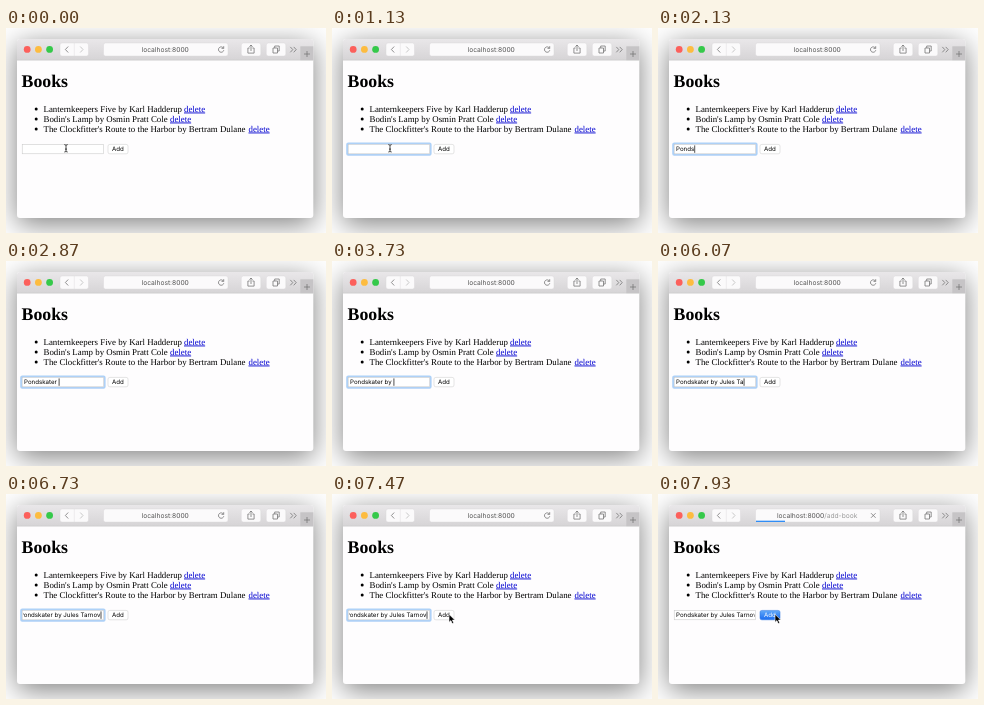
Animation, 320 px wide and 205 px high, one loop 8000 ms. Source, as an HTML page:

```html
<!DOCTYPE html>
<html lang="en">
<head>
<meta charset="utf-8">
<title>Books</title>
<style>
  html, body { margin: 0; width: 100%; height: 100%; overflow: hidden; background: #fff; }
  svg { display: block; width: 100%; height: 100%; }
  text { text-rendering: geometricPrecision; white-space: pre; }
  .ui { font-family: Inter, Roboto, sans-serif; font-size: 6.15px; }
  .page { font-family: "Liberation Serif", "Times New Roman", serif; font-size: 8.86px; }
  .link { fill: #0000d0; text-decoration: underline; }
  .icon { fill: none; stroke: #777; stroke-width: .8; }
  .control { fill: #fbfafb; stroke: #d6d4d6; stroke-width: .4; }
  #win { filter: drop-shadow(0 6px 14px rgba(0, 0, 0, .5)); }
</style>
</head>
<body>
<svg viewBox="0 0 320 205">
  <defs>
    <linearGradient id="bar" x2="0" y2="1">
      <stop stop-color="#e9e7e9"/><stop offset="1" stop-color="#d6d4d6"/>
    </linearGradient>
    <linearGradient id="blue" x2="0" y2="1">
      <stop stop-color="#62a9f8"/><stop offset="1" stop-color="#1a6cf0"/>
    </linearGradient>
    <clipPath id="inner"><path d="M17.3 116h79.4v10h-79.4z"/></clipPath>
  </defs>

  <rect id="win" x="11" y="11" width="296.3" height="179" rx="3" fill="#fefdfe"/>
  <path d="M11 32.2V14a3 3 0 0 1 3-3h290.3a3 3 0 0 1 3 3v18.2z" fill="url(#bar)"/>
  <path d="M294.3 18.3h13v13.9h-13z" fill="#c6c4c6"/>
  <path d="M11 32.1h296.3" stroke="#c2c0c2" stroke-width=".5"/>
  <circle cx="21.2" cy="21.4" r="3.4" fill="#fc605c"/>
  <circle cx="32.4" cy="21.4" r="3.4" fill="#fdbc40"/>
  <circle cx="43.6" cy="21.4" r="3.4" fill="#35c94a"/>

  <g class="control">
    <rect x="54" y="15" width="28.5" height="13" rx="2"/>
    <rect x="97.5" y="15" width="124.5" height="13" rx="2"/>
    <rect x="235.3" y="15" width="19.5" height="13" rx="2"/>
    <rect x="260.3" y="15" width="19.5" height="13" rx="2"/>
    <path d="M68.3 15v13"/>
  </g>
  <g class="icon">
    <path d="M62.2 18.5l-2.8 3 2.8 3"/>
    <path d="M74.2 18.5l2.8 3-2.8 3" stroke="#bbb"/>
    <path d="M243.6 20h-1.7v5.1h6.2V20h-1.7M245 23v-6m-1.6 1.6l1.6-1.6 1.6 1.6"/>
    <path d="M267 20h4.5v5H267zM268.7 20v-2h4.5v5h-1.7"/>
    <path d="M284.3 18.9l2.5 2.7-2.5 2.7m3.4-5.4l2.5 2.7-2.5 2.7"/>
    <path d="M298 26h6m-3-3v6"/>
    <path id="reload" d="M217.5 20.2a2.7 2.7 0 1 0 .3 2m-2.3-1.8h2.2v-2.2"/>
    <path id="stop" d="M213 19.2l4.6 4.6m0-4.6l-4.6 4.6"/>
  </g>
  <text class="ui" y="23.9" x="159.2" text-anchor="middle" style="font-size:6.7px" fill="#555">localhost:8000<tspan id="path" fill="#999"></tspan></text>
  <rect id="progress" x="98" y="26.7" width="0" height="1.2" fill="#1b82f5"/>

  <g class="page">
    <text x="15.6" y="59.3" font-weight="bold" style="font-size:17.8px">Books</text>
    <g id="list"></g>
  </g>

  <rect id="ring" x="15.2" y="115.5" width="83.4" height="11.2" rx="1" fill="none" stroke="#aed1f7"/>
  <rect x="16.2" y="116.4" width="81.4" height="9.4" fill="#fff" stroke="#c4c4c4" stroke-width=".5"/>
  <g clip-path="url(#inner)">
    <text id="entry" class="ui" y="123.3"></text>
    <path id="caret" d="M0 117.4v7.4" stroke="#000" stroke-width=".7"/>
  </g>
  <rect id="button" x="102" y="116.4" width="20" height="9.4" rx="1.8" stroke-width=".5"/>
  <text id="label" class="ui" x="112" y="123.3" text-anchor="middle">Add</text>

  <path id="beam" d="M-1.7-3.7q1.7 0 1.7 1 0-1 1.7-1M0-2.7v5.4M-1.7 3.7q1.7 0 1.7-1 0 1 1.7 1M-1 .8h2" fill="none" stroke="#111" stroke-width=".75"/>
  <path id="arrow" d="M0 0v8l1.9-1.7 1.3 3 1.5-.7-1.3-2.8h2.5z" fill="#000" stroke="#fff" stroke-width=".6"/>
</svg>
<script>
const $ = id => document.getElementById(id);
const show = (id, on) => $(id).setAttribute("visibility", on ? "visible" : "hidden");
const place = (id, x, y) => $(id).setAttribute("transform", `translate(${x} ${y})`);
const ramp = (t, a, b) => Math.min(1, Math.max(0, (t - a) / (b - a)));
const ease = p => p * p * (3 - 2 * p);

const books = [
  ["Lanternkeepers Five by Karl Hadderup", 178],
  ["Bodin's Lamp by Osmin Pratt Cole", 164],
  ["The Clockfitter's Route to the Harbor by Bertram Dulane", 242.5]
];
$("list").innerHTML = books.map(([name, x], i) => {
  const y = 83.5 + i * 10;
  return `<circle cx="30.2" cy="${y - 2.5}" r="1.5"/><text x="37.5" y="${y}">${name}</text>
    <text class="link" x="${x}" y="${y}">delete</text>`;
}).join("");

// "<" is a backspace; each key has its press time
const keys = "Pondskater by Julea<s Tarnov";
const presses = [
  1530, 1670, 1800, 1930, 2070, 2470, 2530, 2600, 2670, 2800, 2870, 2930, 3070, 3130,
  4270, 4330, 4870, 5070, 5270, 5530, 5670, 5870, 5930, 6000, 6130, 6200, 6530, 6600
];
const CLICK = 7530, LOAD = 7670;

function typed(t) {
  let s = "";
  presses.forEach((at, i) => {
    if (t >= at) s = keys[i] === "<" ? s.slice(0, -1) : s + keys[i];
  });
  return s;
}

function drawField(t) {
  const focused = t >= 870 && t < CLICK, entry = $("entry");
  entry.textContent = typed(t);
  const width = entry.textContent ? entry.getComputedTextLength() : 0;
  const x = focused ? Math.min(18, 94.5 - width) : 18;
  entry.setAttribute("x", x);
  place("caret", x + width + .5, 0);
  const blink = t >= 3530 && t < 3730 || t >= 4000 && t < 4270;
  show("caret", focused && t >= 1330 && !blink);

  const p = ease(ramp(t, 870, 1130));
  $("ring").setAttribute("stroke-width", 5 - 3 * p);
  $("ring").setAttribute("opacity", focused ? p : 0);
}

function drawPointer(t) {
  let x = 60 - 2 * ease(ramp(t, 70, 600)), y = 120.3;
  if (t >= 7000) {
    const p = ease(ramp(t, 7000, 7470));
    x = 58 + 59 * p;
    y = 120.3 + 40 * p * (1 - p);
  }
  const inField = x < 98 && y < 126.5;
  show("beam", t < 1530 || t >= 7000 && inField);
  show("arrow", t >= 7000 && !inField);
  place("beam", x, y);
  place("arrow", x, y);
}

function draw(now) {
  const t = now % 8000, pressed = t >= CLICK, loading = t >= LOAD;
  drawField(t);
  drawPointer(t);
  $("button").setAttribute("fill", pressed ? "url(#blue)" : "#fff");
  $("button").setAttribute("stroke", pressed ? "#2a72dd" : "#c8c8c8");
  $("label").setAttribute("fill", pressed ? "#fff" : "#000");
  $("path").textContent = loading ? "/add-book" : "";
  $("progress").setAttribute("width", 29 * ramp(t, LOAD - 60, 7930));
  show("progress", loading);
  show("reload", !loading);
  show("stop", loading);
  requestAnimationFrame(draw);
}
requestAnimationFrame(draw);
</script>
</body>
</html>
```
